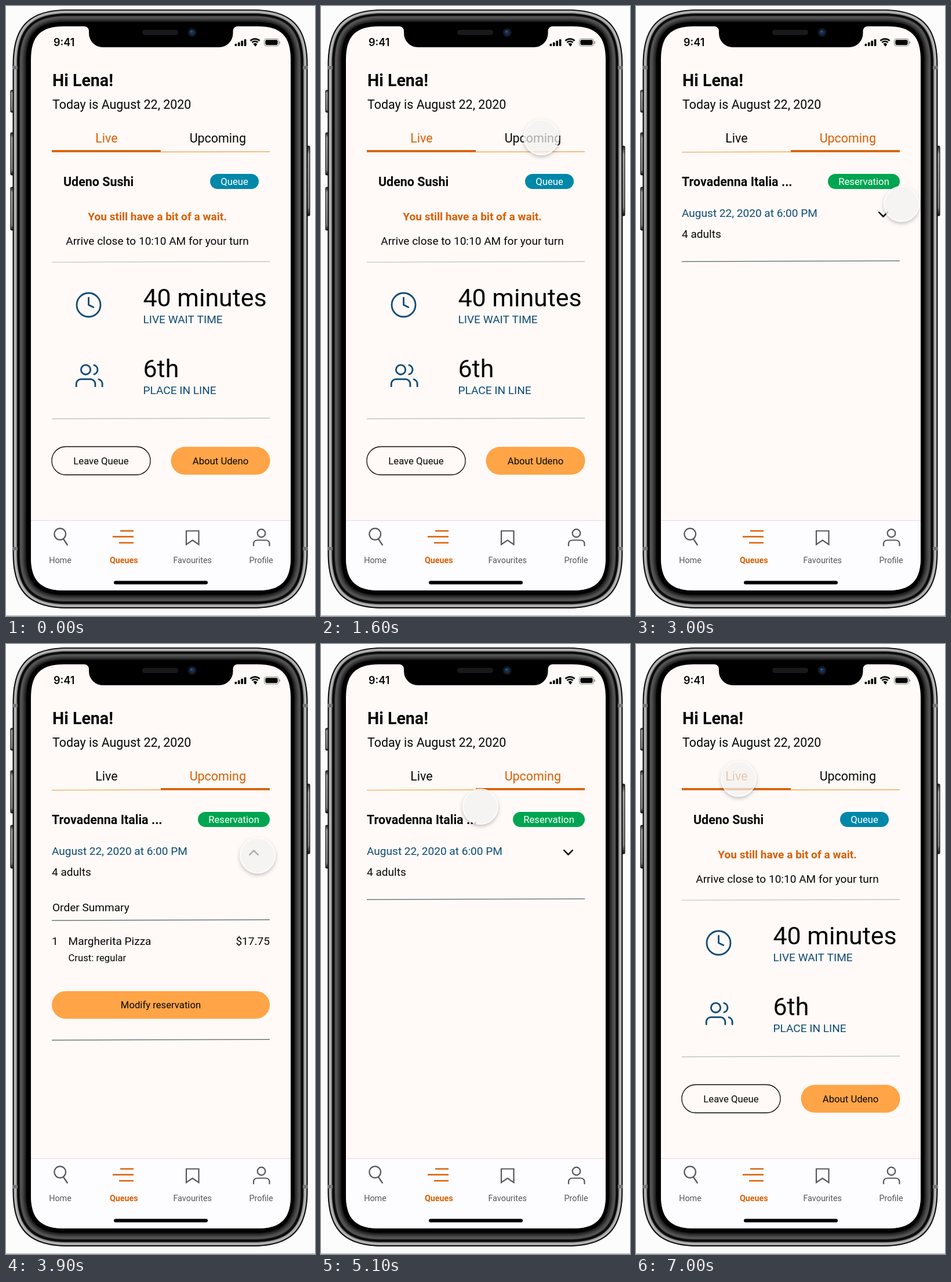
An HTML page with a canvas that plays this animation: 533 by 1050 pixels, repeating every 7.1 s.

```html
<!DOCTYPE html>
<html lang="en">
<head>
<meta charset="utf-8">
<title>Queue app</title>
<style>
html, body { margin: 0; width: 100%; height: 100%; overflow: hidden; background: #fdfcfd; }
canvas { display: block; width: 533px; height: 1050px; }
</style>
</head>
<body>
<canvas id="stage"></canvas>
<script>
const W = 533, H = 1050, LOOP = 7100;
const INK = '#060606', ORANGE = '#d95f02', AMBER = '#ffa447', NAVY = '#0b4a76', GREY = '#58565b';
const S = 19.07, M = 21.45, XS = 16.7;

const canvas = document.getElementById('stage');
const dpr = window.devicePixelRatio || 1;
canvas.width = W * dpr;
canvas.height = H * dpr;
const c = canvas.getContext('2d');

function box(x0, y0, x1, y1, r, fill, stroke, lw = 1.3) {
  c.beginPath();
  c.roundRect(x0, y0, x1 - x0, y1 - y0, r);
  if (fill) { c.fillStyle = fill; c.fill(); }
  if (stroke) { c.strokeStyle = stroke; c.lineWidth = lw; c.stroke(); }
}

// rectangle whose corners ease gradually into the sides
function softRect(x0, y0, x1, y1, r) {
  const e = r * 1.25, h = e * .29;
  const p = new Path2D();
  p.moveTo(x0 + e, y0);
  p.lineTo(x1 - e, y0);
  p.bezierCurveTo(x1 - h, y0, x1, y0 + h, x1, y0 + e);
  p.lineTo(x1, y1 - e);
  p.bezierCurveTo(x1, y1 - h, x1 - h, y1, x1 - e, y1);
  p.lineTo(x0 + e, y1);
  p.bezierCurveTo(x0 + h, y1, x0, y1 - h, x0, y1 - e);
  p.lineTo(x0, y0 + e);
  p.bezierCurveTo(x0, y0 + h, x0 + h, y0, x0 + e, y0);
  p.closePath();
  return p;
}

function line(points, color, lw, cap = 'butt') {
  c.beginPath();
  for (let i = 0; i < points.length; i += 2) c.lineTo(points[i], points[i + 1]);
  c.strokeStyle = color;
  c.lineWidth = lw;
  c.lineCap = cap;
  c.lineJoin = cap === 'round' ? 'round' : 'miter';
  c.stroke();
}

function ring(x, y, r, color, lw) {
  c.beginPath();
  c.arc(x, y, r, 0, Math.PI * 2);
  c.strokeStyle = color;
  c.lineWidth = lw;
  c.stroke();
}

function disc(x, y, r, color) {
  c.beginPath();
  c.arc(x, y, r, 0, Math.PI * 2);
  c.fillStyle = color;
  c.fill();
}

function text(str, x, y, size, color = INK, weight = 400, align = 'left', family = 'Roboto') {
  c.font = `${weight} ${size}px ${family}, sans-serif`;
  c.textAlign = align;
  c.fillStyle = color;
  c.fillText(str, x, y);
}

const centered = (str, x, y, size, color, weight) => text(str, x, y, size, color, weight, 'center');
const divider = (y, color) => line([79, y + .6, 455, y - .6], color, 1.2);

function icon(paths, x, y, scale) {
  c.save();
  c.translate(x, y);
  c.scale(scale, scale);
  c.strokeStyle = NAVY;
  c.lineWidth = 2.8 / scale;
  c.lineCap = c.lineJoin = 'round';
  for (const d of paths) c.stroke(new Path2D(d));
  c.restore();
}

const SCREEN = softRect(43, 35, 491, 1006, 46);

// depth into the frame and grey level there
const RIM = [[0, 10], [1.5, 20], [2.5, 190], [6, 165], [8, 12], [11, 10], [13, 88], [16, 78], [22, 30], [24, 0], [32, 0]];

function rimGrey(depth) {
  const i = RIM.findIndex(stop => stop[0] > depth);
  const [d0, g0] = RIM[i - 1], [d1, g1] = RIM[i];
  return Math.round(g0 + (g1 - g0) * (depth - d0) / (d1 - d0));
}

function phone() {
  c.fillStyle = '#fdfcfd';
  c.fillRect(0, 0, W, H);
  c.fillStyle = '#aaa';
  c.fillRect(0, 1049, W, 1);

  // side buttons
  for (const [x, y0, y1] of [[8, 145, 183], [8, 218, 291], [8, 312, 386], [517, 241, 361]]) {
    const g = c.createLinearGradient(0, y0, 0, y1);
    g.addColorStop(0, '#222');
    g.addColorStop(.12, '#aaa');
    g.addColorStop(.88, '#888');
    g.addColorStop(1, '#111');
    box(x, y0, x + 7, y1, 2, g, '#111', 1.2);
  }

  // metal band and bezel, outside in
  for (let d = 0; d < 25; d += .5) {
    const g = rimGrey(d);
    c.fillStyle = `rgb(${g},${g},${g})`;
    c.fill(softRect(11.5 + d, 6 + d * .92, 520.5 - d, 1037 - d, 77 - d));
  }
  c.fillStyle = '#77777b';
  for (const y of [103, 931]) {
    c.fillRect(12, y, 8, 6);
    c.fillRect(512, y, 8, 6);
  }
  c.fillStyle = '#fffaf7';
  c.fill(SCREEN);

  // notch
  c.fillStyle = '#000';
  c.fill(new Path2D('M134 34V35H135A8 8 0 0 1 143 43V47A24 24 0 0 0 167 71H367.5A24 24 0 0 0 391.5 47V43A8 8 0 0 1 399.5 35H400V34Z'));
  box(235, 41, 297, 50, 4.5, '#19191b');
  disc(321, 45.5, 7.5, '#15171d');
  disc(321, 45.5, 4.6, '#142f52');
  disc(320, 44, 1.8, '#285a8d');
}

function statusBar() {
  text('9:41', 82, 69, 18, INK, 600, 'left', 'Inter');
  for (let i = 0; i < 4; i++) box(394.5 + i * 5.4, 65 - i * 2.6, 398.2 + i * 5.4, 69, 1, INK);
  for (const r of [3, 7.2, 11.4]) {
    c.beginPath();
    c.arc(429.5, 68, r, -Math.PI * .75, -Math.PI * .25);
    if (r === 3) {
      c.lineTo(429.5, 69);
      c.fillStyle = INK;
      c.fill();
    }
    c.strokeStyle = INK;
    c.lineWidth = 2.6;
    c.lineCap = 'butt';
    c.stroke();
  }
  box(445.5, 56.5, 470.5, 69, 3.8, null, '#8b898a', 1.1);
  box(447.3, 58.3, 468.7, 67.2, 2.4, INK);
  box(471.5, 60.8, 473, 65, 1, '#8b898a');
}

function nav() {
  c.save();
  c.clip(SCREEN);
  c.fillStyle = '#fdfcfe';
  c.fillRect(43, 885, 448, 121);
  c.fillStyle = '#e1dfe2';
  c.fillRect(43, 885, 448, 1.2);
  c.restore();

  ring(93.2, 909, 9.8, GREY, 2.2);
  line([99, 917.5, 105.8, 927.5], GREY, 2.3, 'round');
  line([197, 903.5, 220, 903.5], ORANGE, 2.4);
  line([184, 913.5, 220, 913.5], ORANGE, 2.4);
  line([195, 924, 220, 924], ORANGE, 2.4);
  c.strokeStyle = GREY;
  c.lineWidth = 2.2;
  c.lineJoin = 'miter';
  c.stroke(new Path2D('M311 903.5H332.5V927L321.7 919.5L311 927Z'));
  ring(440.5, 907.5, 6.8, GREY, 2.2);
  c.lineCap = 'round';
  c.stroke(new Path2D('M427 929V926Q427 919.5 434 919.5H447.5Q454.5 919.5 454.5 926V929'));

  centered('Home', 93.5, 959, 14.4, GREY);
  centered('Queues', 203.3, 959, 14.3, ORANGE, 700);
  centered('Favourites', 321.7, 959, 14.4, GREY);
  centered('Profile', 440, 959, 14.4, GREY);
  box(186, 989.5, 348, 995.5, 3, '#000');
}

function header(live) {
  text('Hi Lena!', 80, 138, 28.6, INK, 700);
  text('Today is August 22, 2020', 80, 177.2, M);
  centered('Live', 173.5, 235, M, live ? ORANGE : INK);
  centered('Upcoming', 365.3, 235, M, live ? INK : ORANGE);
  line(live ? [267, 251.2, 455, 250.8] : [79, 251.6, 267, 251], '#f5aa58', 1.4);
  c.fillStyle = ORANGE;
  c.fillRect(live ? 79 : 267, 248, 188, 3.7);
}

function pill(label, x0, x1, color) {
  box(x0, 289, x1, 315, 13, color);
  centered(label, (x0 + x1) / 2, 307.7, XS, '#fff');
}

function button(label, x0, x1, y0, y1, fill, stroke) {
  box(x0, y0, x1, y1, 24, fill, stroke);
  centered(label, (x0 + x1) / 2, (y0 + y1) / 2 + 6, XS);
}

function liveTab() {
  text('Udeno Sushi', 99, 309.5, M, INK, 700);
  pill('Queue', 352, 436, '#0088a8');
  centered('You still have a bit of a wait.', 261, 369, S, ORANGE, 700);
  centered('Arrive close to 10:10 AM for your turn', 261, 411, S);
  divider(440.4, '#b3bcbf');

  icon(['M22 12A10 10 0 1 1 2 12A10 10 0 1 1 22 12', 'M12 6V12L16 14'], 117.9, 489.9, 2.05);
  text('40 minutes', 236.5, 517, 42.9);
  text('LIVE WAIT TIME', 236.5, 546, S, NAVY);
  icon(['M17 21v-2a4 4 0 0 0-4-4H5a4 4 0 0 0-4 4v2', 'M13 7A4 4 0 1 1 5 7A4 4 0 1 1 13 7',
    'M23 21v-2a4 4 0 0 0-3-3.87', 'M16 3.13a4 4 0 0 1 0 7.75'], 119.2, 611.8, 2.04);
  text('6th', 236.5, 639, 42.9);
  text('PLACE IN LINE', 236.5, 668, S, NAVY);
  divider(710, '#b3bcbf');

  button('Leave Queue', 79, 249, 758.5, 807, null, INK);
  button('About Udeno', 284.5, 455.5, 758.8, 806.8, AMBER);
}

function upcomingTab(open) {
  text('Trovadenna Italia ...', 79, 309.5, M, INK, 700);
  pill('Reservation', 331, 455, '#00a551');
  text('August 22, 2020 at 6:00 PM', 79, 363, S, NAVY);
  text('4 adults', 79, 399, S);
  if (!open) {
    line([419.2, 355.2, 426.5, 362.5, 433.8, 355.2], INK, 2.5, 'round');
    divider(439.2, '#53666b');
    return;
  }
  line([420.2, 362.8, 427.5, 355.5, 434.8, 362.8], INK, 2.5, 'round');
  text('Order Summary', 80, 460, S);
  divider(475.2, '#555e60');
  text('1', 79, 518.3, S);
  text('Margherita Pizza', 107.5, 518.3, S);
  text('$17.75', 455, 518.3, S, INK, 400, 'right');
  text('Crust: regular', 107.5, 546, XS);
  button('Modify reservation', 79, 455, 597.5, 645, AMBER);
  divider(681.3, '#555e60');
}

// time, x, y of the pointer
const KEYS = [
  [0, 600, 800], [100, 556, 765], [900, 384, 293], [1400, 380, 226], [2450, 380, 226],
  [2900, 464, 335], [3250, 434, 364], [4800, 434, 364], [5325, 173, 226],
  [6500, 173, 226], [7000, 177, 232], [LOOP, 177, 232]
];
const smooth = u => u * u * (3 - 2 * u);
const easeOut = u => 1 - (1 - u) * (1 - u);

function pointerAt(t) {
  const i = KEYS.findIndex(k => k[0] > t);
  const [t0, x0, y0] = KEYS[i - 1], [t1, x1, y1] = KEYS[i];
  const u = (t - t0) / (t1 - t0);
  const e = t1 === 900 ? easeOut(u) : smooth(u);
  return [x0 + (x1 - x0) * e, y0 + (y1 - y0) * e];
}

function pointer(x, y) {
  const r = 31;
  // shadow only outside the translucent disc
  c.save();
  c.beginPath();
  c.rect(x - 60, y - 60, 120, 120);
  c.arc(x, y, r, 0, Math.PI * 2);
  c.clip('evenodd');
  c.shadowColor = 'rgba(0,0,0,.26)';
  c.shadowBlur = 6 * dpr;
  c.shadowOffsetY = 3 * dpr;
  disc(x, y, r - .5, '#fff');
  c.restore();
  disc(x, y, r, 'rgba(242,242,241,.7)');
  ring(x, y, r - 1, 'rgba(255,255,255,.7)', 2);
}

function draw(t) {
  const live = t < 1800 || t >= 5500;
  const open = t >= 3500 && t < 4500;
  c.setTransform(dpr, 0, 0, dpr, 0, 0);
  phone();
  statusBar();
  header(live);
  if (live) liveTab();
  else upcomingTab(open);
  nav();
  if (t >= 100) pointer(...pointerAt(t));
}

const start = performance.now();
function tick() {
  draw((performance.now() - start) % LOOP);
  requestAnimationFrame(tick);
}
tick();
</script>
</body>
</html>
```
